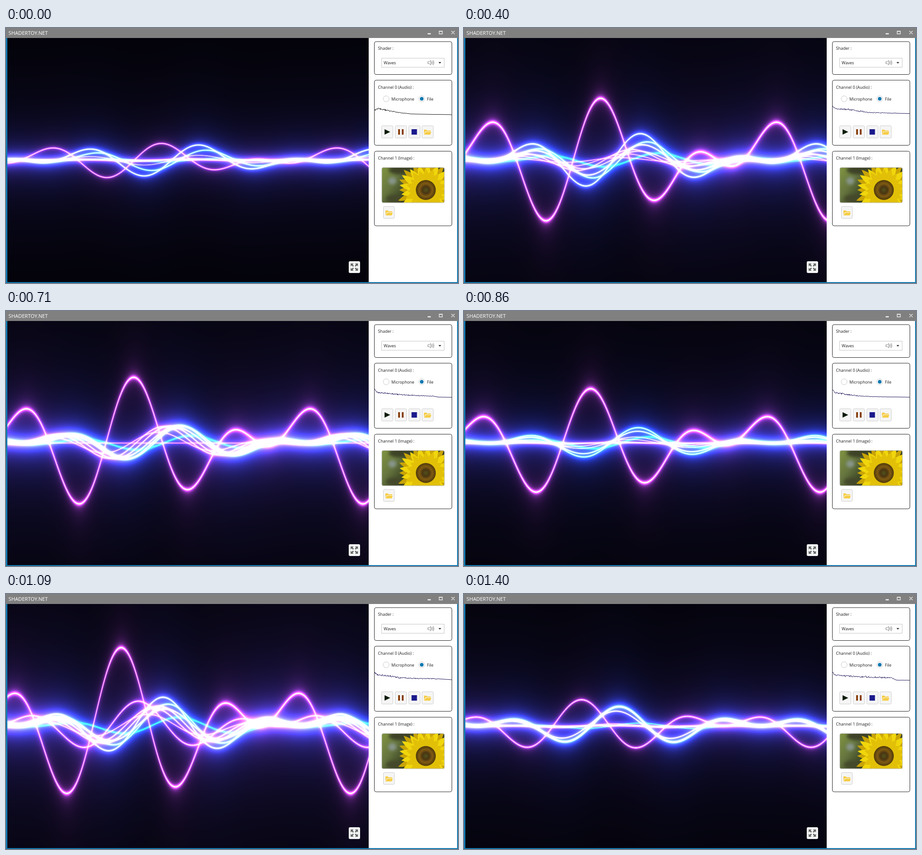
Write an HTML page with a canvas that moves like this. It is 997 by 562 pixels and loops after 1.48 s.

```html
<!DOCTYPE html>
<html lang="en">
<head>
<meta charset="utf-8">
<title>Waves</title>
<style>
  html, body { margin: 0; width: 100%; height: 100%; overflow: hidden; background: #fff; }
  canvas { position: absolute; left: 3px; top: 22px; }
  svg { position: absolute; left: 0; top: 0; }
  text { font: 9px "Open Sans", "Noto Sans", sans-serif; fill: #1c1c1c; }
  .title { font-size: 11.2px; fill: #fff; }
  .panel { fill: none; stroke: #222; }
  .button { fill: #f5f5f5; stroke: #cdcdcd; }
</style>
</head>
<body>
<canvas id="screen" width="797" height="538"></canvas>
<svg width="997" height="562" viewBox="0 0 997 562">
  <defs>
    <clipPath id="photo"><rect x="829" y="308" width="138" height="77" rx="3"/></clipPath>
    <linearGradient id="meadow" x2="1" y2=".4">
      <stop stop-color="#7f9440"/><stop offset=".3" stop-color="#66753f"/><stop offset=".6" stop-color="#343d20"/>
    </linearGradient>
    <radialGradient id="seeds">
      <stop stop-color="#50521c"/><stop offset=".35" stop-color="#4a3512"/>
      <stop offset=".65" stop-color="#805a12"/><stop offset="1" stop-color="#4e390b"/>
    </radialGradient>
    <filter id="soft"><feGaussianBlur stdDeviation="3"/></filter>
    <path id="folder" d="M0 11V1h5l2 2h8v2H3zM4 6h12l-2 6H0z" fill="#f6cd46"/>
    <path id="arrow" d="M-8-8h6.5L-3.700-5.800-1-3-3-1-5.800-3.700-8-1.500z" fill="#666"/>
  </defs>

  <rect width="997" height="22" fill="#808080"/>
  <path d="M0 22h3v538h992V22h2v540H0z" fill="#0f78b0"/>
  <text class="title" x="5.500" y="14.500">SHADERTOY.NET</text>
  <path d="M930 11.500h7v2.500h-7z" fill="#eee"/>
  <path d="M955.500 7v6h7V7zM955 7.500h8M982.500 6.500l7 7m0-7l-7 7" fill="none" stroke="#eee" stroke-width="1.300"/>

  <rect class="panel" x="812.500" y="30" width="171" height="72.500" rx="4"/>
  <rect class="panel" x="812.500" y="115" width="171" height="143.500" rx="4"/>
  <rect class="panel" x="812.500" y="271.500" width="171" height="164.500" rx="4"/>

  <text x="820.500" y="48">Shader :</text>
  <rect x="828.500" y="66.500" width="138" height="20" fill="#fff" stroke="#c6c6c6"/>
  <text x="833" y="79.500">Waves</text>
  <path d="M930.500 74.500h3l3.500-3v10l-3.500-3h-3zM938.500 74q2 2.500 0 5M940.500 72.500q3 4 0 8M942 71q4 5.500 0 11" fill="none" stroke="#777" stroke-width=".9"/>
  <path d="M954 75h6l-3 3.500z" fill="#333"/>

  <text x="820.500" y="133.500">Channel 0 (Audio) :</text>
  <g fill="#fff" stroke="#c8c8c8"><circle cx="838.500" cy="156" r="6.500"/><circle cx="917" cy="156" r="6.500"/></g>
  <circle cx="917" cy="156" r="4" fill="#0f78b0"/>
  <text x="850" y="160">Microphone</text>
  <text x="928.500" y="160">File</text>
  <path id="spectrum" fill="none"/>
  <g class="button">
    <rect x="828.500" y="215.500" width="25" height="27" rx="2"/>
    <rect x="858.500" y="215.500" width="25" height="27" rx="2"/>
    <rect x="888.500" y="215.500" width="25" height="27" rx="2"/>
    <rect x="917.500" y="215.500" width="25" height="27" rx="2"/>
    <rect x="832.500" y="393.500" width="24" height="26" rx="2"/>
  </g>
  <path d="M835 223l12.500 6-12.500 6z" fill="#0c1c08"/>
  <path d="M865 223h4v12h-4zm8 0h4v12h-4z" fill="#873e0c"/>
  <path d="M894.500 223h12v12h-12z" fill="#1b1a8c"/>
  <use href="#folder" x="922" y="223"/>

  <text x="820.500" y="289.500">Channel 1 (Image) :</text>
  <g clip-path="url(#photo)">
    <rect x="829" y="308" width="138" height="77" fill="url(#meadow)"/>
    <g filter="url(#soft)">
      <ellipse cx="872" cy="313" rx="28" ry="10" fill="#3d4326"/>
      <ellipse cx="852" cy="337" rx="9" ry="8" fill="#86948a"/>
      <ellipse cx="858" cy="376" rx="20" ry="9" fill="#454a2c"/>
    </g>
    <g id="petals"></g>
    <circle cx="926" cy="357" r="22" fill="url(#seeds)"/>
  </g>
  <rect x="829" y="307.500" width="138" height="77.500" rx="3" fill="none" stroke="#b5b5b5"/>
  <use href="#folder" x="837" y="401"/>

  <rect x="756" y="514" width="25" height="26" rx="3" fill="#f3f5f5"/>
  <g id="expand" transform="translate(768.300 527)"></g>
</svg>
<script>
const FRAME_STARTS = [0, 90, 170, 240, 320, 400, 480, 550, 630, 710, 780, 860, 940, 1010, 1090, 1170, 1250, 1320, 1400];
const LOOP = 1480, WAVES = 8;
const GRAPH_X = [813, 819, 848, 870, 895, 943, 954, 983];

// Audio moments: wave phase, level of each band, heights of the spectrum line
const MOMENTS = [
  { at: 0, phase: 2.71, bands: [.654, 1.75, 1.78, .42, .1, .05, .03, 0], graph: [182, 177.5, 183, 187, 189.5, 190.5, 190.5, 191] },
  { at: 2, phase: 2.99, bands: [2.83, 2.1, 1.3, .8, 1.12, .03, 0, 0], graph: [172, 180, 184, 186, 188, 189, 189, 189.5] },
  { at: 5, phase: 3.27, bands: [2.34, 3.1, 3, 1.3, .6, .6, .3, .1], graph: [173, 178, 179.5, 183, 186, 187.5, 188, 188.5] },
  { at: 7, phase: 3.56, bands: [2.87, 3.1, 2.6, 2.1, 2, 1.78, 1, 0], graph: [172, 179, 180, 181.5, 182.5, 186, 190, 190.5] },
  { at: 11, phase: 3.95, bands: [2, 2.55, 1.3, .5, .25, .05, .03, 0], graph: [173, 180, 184.5, 187, 188.5, 189.5, 189.5, 190] },
  { at: 14, phase: 4.34, bands: [2.863, 3.6, 3.15, 1.4, 1.3, 1, .55, 1.02], graph: [173, 178, 181, 184.5, 186, 186.5, 187, 189] },
  { at: 18, phase: 4.8, bands: [.958, 3.2, 2.12, 1.22, .15, .06, .03, 0], graph: [173, 179, 181, 182, 183, 185, 190, 190] }
];

const byId = id => document.getElementById(id);
const mix = (a, b, k) => a + (b - a) * k;
const mixAll = (a, b, k) => a.map((v, i) => mix(v, b[i], k));
const noise = (x, seed) => {
  const n = Math.sin(x * 12.9898 + seed * 78.233) * 43758.5453;
  return (n - Math.floor(n)) * 2 - 1;
};

const canvas = byId("screen"), { width, height } = canvas;
const context = canvas.getContext("2d");
const picture = context.createImageData(width, height);
const spectrum = byId("spectrum");

function momentAt(frame) {
  const next = Math.max(1, MOMENTS.findIndex(m => m.at >= frame));
  const a = MOMENTS[next - 1], b = MOMENTS[next];
  const k = (frame - a.at) / (b.at - a.at);
  return { phase: mix(a.phase, b.phase, k), bands: mixAll(a.bands, b.bands, k), graph: mixAll(a.graph, b.graph, k) };
}

function drawWaves({ phase, bands }) {
  const count = WAVES + 1, gains = [];
  const heights = new Float64Array(width * count);
  for (let i = 0; i < count; i++) {
    const level = bands[i % WAVES];
    gains[i] = 255 * .01 * 3 / WAVES * Math.min(2, Math.max(.35, level));
    for (let x = 0; x < width; x++) {
      const p = 2 * (x + .5) / width - 1 + i * .04 + level * .03;
      heights[x * count + i] = Math.sin(p * 10 + phase) * Math.cos(p * 2) * level * .2 * (i + 1) / WAVES;
    }
  }
  const data = picture.data;
  for (let y = 0, o = 0; y < height; y++) {
    const v = 1 - 2 * (y + .5) / height;
    for (let x = 0, h = 0; x < width; x++, o += 4) {
      let red = 0, glow = 0;
      for (let i = 0; i < count; i++, h++) {
        const light = gains[i] / (Math.abs(v + heights[h]) + 1e-6);
        red += light * i / 5;
        glow += light;
      }
      data[o] = red;
      data[o + 1] = glow * .5;
      data[o + 2] = glow * 1.75;
      data[o + 3] = 255;
    }
  }
  context.putImageData(picture, 0, 0);
}

function drawSpectrum(graph, frame) {
  const points = [];
  for (let x = 813, s = 0; x <= 983; x++) {
    if (x > GRAPH_X[s + 1]) s++;
    const y = mix(graph[s], graph[s + 1], (x - GRAPH_X[s]) / (GRAPH_X[s + 1] - GRAPH_X[s]));
    const rough = x < 954 ? Math.min(1.8, Math.max(0, 190 - y) * .3) : .15;
    points.push(x + " " + (y + rough * noise(x, frame)).toFixed(2));
  }
  spectrum.setAttribute("d", "M" + points.join("L"));
  spectrum.setAttribute("stroke", frame ? "#1d1457" : "#161616");
}

function petalRing(count, length, colour, offset) {
  let ring = "";
  for (let i = 0; i < count; i++) {
    const reach = length + 5 * noise(i, count);
    ring += `<path d="M0-7Q${reach * .6}-13 ${reach} 0Q${reach * .6} 13 0 7z" fill="${colour}" transform="translate(926 357) rotate(${(i + offset) * 360 / count})"/>`;
  }
  return ring;
}

byId("petals").innerHTML = petalRing(17, 62, "#c9a406", .5) + petalRing(17, 58, "#f0d60c", 0) + petalRing(19, 44, "#e2c008", .3);
byId("expand").innerHTML = [0, 90, 180, 270].map(a => `<use href="#arrow" transform="rotate(${a})"/>`).join("");

let shown = -1;
function tick() {
  const time = performance.now() % LOOP;
  const frame = FRAME_STARTS.filter(start => start <= time).length - 1;
  if (frame !== shown) {
    const moment = momentAt(frame);
    drawWaves(moment);
    drawSpectrum(moment.graph, frame);
    shown = frame;
  }
  requestAnimationFrame(tick);
}
tick();
</script>
</body>
</html>
```
